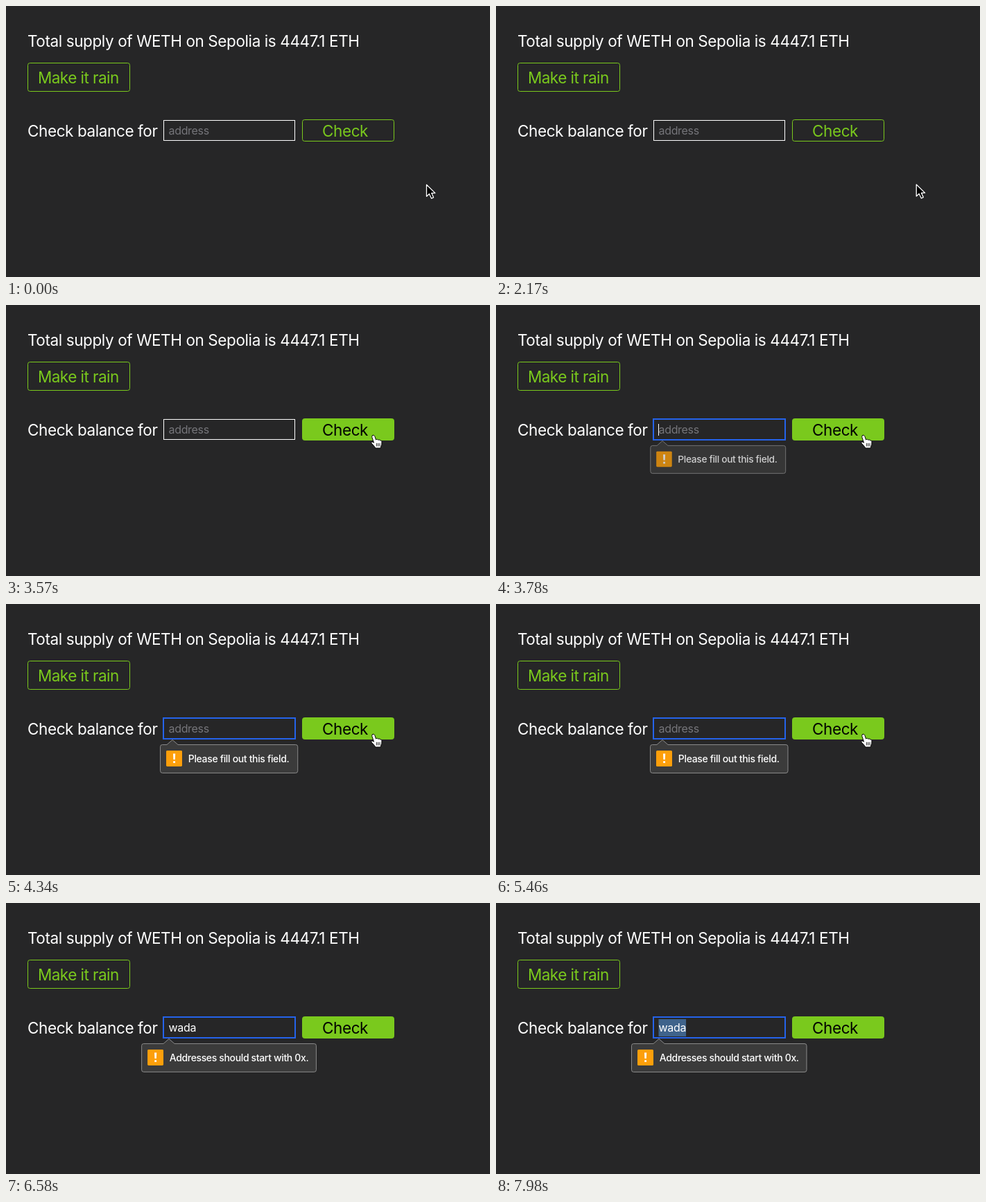
Write an HTML page that moves like this. It is 698 by 392 pixels and loops after 8000 ms.

```html
<!DOCTYPE html>
<html lang="en">
<head>
<meta charset="utf-8">
<title>Check balance</title>
<style>
  html, body { margin: 0; width: 100%; height: 100%; overflow: hidden; background: #262627; }
  svg { display: block; }
  text { font-family: Inter, "Open Sans", sans-serif; fill: #fff; white-space: pre; }
  .big { font-size: 22.5px; letter-spacing: -.4px; }
  .green { fill: #7ac91d; }
  .line { fill: none; stroke: #7ac91d; }
  .field { font-size: 16px; letter-spacing: -.32px; }
  .tip text { font-size: 14px; font-weight: 500; letter-spacing: -.33px; }
  .tip .box { fill: #3b3b3b; stroke: #8b8b8b; }
</style>
</head>
<body>
<svg width="698" height="392" viewBox="0 0 698 392">
  <rect width="698" height="392" fill="#262627"/>
  <text class="big" x="31" y="59">Total supply of WETH on Sepolia is 4447.1 ETH</text>
  <rect class="line" x="31.5" y="82.5" width="147" height="41" rx="3"/>
  <text class="big green" x="46" y="112" style="letter-spacing:-.55px">Make it rain</text>
  <text class="big" x="31" y="189">Check balance for</text>

  <rect id="idle" x="227.5" y="165.5" width="189" height="29" fill="none" stroke="#fff"/>
  <rect id="focus" x="227" y="165" width="190" height="30" fill="none" stroke="#2563eb" stroke-width="2"/>
  <rect id="mark" x="234.5" y="168" height="25" fill="#3f638b"/>
  <text id="hint" class="field" x="234.5" y="186" style="fill:#75757a">address</text>
  <text id="value" class="field" x="234.5" y="186"></text>
  <rect id="caret" y="172" width="1" height="17" fill="#fff"/>

  <rect id="button" x="427.5" y="164.5" width="132" height="31" rx="3" stroke="#7ac91d"/>
  <text id="check" class="big" x="456" y="189">Check</text>

  <g id="tips"></g>

  <path id="arrow" d="M.5 .5V17.4L4.4 13.8L7.5 20.3L10.6 18.9L7.7 12.6H12.9Z"
        fill="#000" stroke="#fff" stroke-width="1.3" stroke-linejoin="round"/>
  <g id="hand" stroke="#000" stroke-linejoin="round" stroke-linecap="round">
    <path fill="#fff" d="M3.4 1.6C5 .9 6 1.9 6.5 3.4L8 8C9 6.9 10.8 7.1 11.2 8.4C12.3 7.5 13.8 7.9 14.1 9.1C15.3 8.6 16.4 9.4 16.5 10.8L16.3 14.5C16 16.5 15 17.5 14.7 20H7.2C6.5 18 4 15.5 1.6 13C.4 11.6 2 10.3 3.5 11.2L5 12.2L2.4 4.4C2 3 2.2 2 3.4 1.6Z"/>
    <path fill="none" stroke-width=".9" d="M8.9 13.2V17M11.2 13.2V17M13.5 13.2V17"/>
  </g>
</svg>
<script>
const LOOP = 8000, FOCUS = 3600, TYPE = 5810, SUBMIT = 5985, SELECT = 7700;
const KEYS = [TYPE, 5870, 5920, 5965];
const BLINK = 500;
const $ = id => document.getElementById(id);
const show = (el, on) => el.setAttribute('visibility', on ? 'visible' : 'hidden');
const clamp = v => Math.min(1, Math.max(0, v));
const ease = v => v * v * (3 - 2 * v);

// Cursor position by time: [ms, x, y]
const PATH = [[0, 606, 258], [2150, 606, 258], [2780, 527, 187.5], [3220, 527, 187.5], [3480, 525.5, 187]];

const tips = [
  { text: 'Please fill out this field.', left: 222.5, right: 421, apex: 240, from: FOCUS, to: TYPE },
  { text: 'Addresses should start with 0x.', left: 195.5, right: 448, apex: 235, from: SUBMIT, to: Infinity }
];

function buildTip(tip) {
  const { left, right, apex, text } = tip, icon = left + 8.5;
  const g = document.createElementNS('http://www.w3.org/2000/svg', 'g');
  g.setAttribute('class', 'tip');
  g.innerHTML = `
    <path class="box" d="M${left + 3} 203.5H${apex - 8}L${apex} 196.5L${apex + 8} 203.5H${right - 3}
      q3 0 3 3V241.5q0 3 -3 3H${left + 3}q-3 0 -3 -3V206.5q0 -3 3 -3Z"/>
    <rect x="${icon}" y="212" width="23" height="23" rx="1.5" fill="#fd9f0b"/>
    <path d="M${icon + 10} 216.5h3.2l-.4 8.5h-2.4ZM${icon + 10.2} 227.3h2.8v2.8h-2.8Z" fill="#fff"/>
    <text x="${icon + 31.8}" y="229">${text}</text>`;
  $('tips').append(g);
  tip.el = g;
}
tips.forEach(buildTip);

function drawTip({ el, apex, from, to }, t) {
  const age = t - from;
  const alpha = clamp(age / 233) * (1 - clamp((t - to) / 133));
  const scale = 1 - .042 * Math.exp(-Math.max(0, age) / 220);
  show(el, alpha > 0);
  el.setAttribute('opacity', alpha);
  el.setAttribute('transform', `translate(${apex} 197) scale(${scale}) translate(${-apex} -197)`);
}

function cursorAt(t) {
  const i = PATH.findIndex(p => p[0] > t);
  if (i < 0) return PATH[PATH.length - 1].slice(1);
  const [t0, x0, y0] = PATH[i - 1], [t1, x1, y1] = PATH[i];
  const k = ease((t - t0) / (t1 - t0));
  return [x0 + (x1 - x0) * k, y0 + (y1 - y0) * k];
}

function render(t) {
  const focused = t >= FOCUS, selected = t >= SELECT;
  const [x, y] = cursorAt(t);
  const hover = x < 558 && y < 195;

  const typed = KEYS.filter(k => k <= t).length;
  $('value').textContent = 'wada'.slice(0, typed);
  const width = typed ? $('value').getComputedTextLength() : 0;
  show($('hint'), !typed);
  show($('idle'), !focused);
  show($('focus'), focused);
  show($('mark'), selected);
  $('mark').setAttribute('width', width);

  const since = t - (typed ? KEYS[typed - 1] : FOCUS);
  show($('caret'), focused && !selected && Math.floor(since / BLINK) % 2 === 0);
  $('caret').setAttribute('x', Math.round(234 + width));

  $('button').setAttribute('fill', hover ? '#7ac91d' : 'none');
  $('check').style.fill = hover ? '#000' : '#7ac91d';

  for (const id of ['arrow', 'hand']) {
    show($(id), t < TYPE && (id === 'hand') === hover);
    $(id).setAttribute('transform', `translate(${x} ${y})`);
  }
  tips.forEach(tip => drawTip(tip, t));
}

const start = performance.now();
function tick() {
  render((performance.now() - start) % LOOP);
  requestAnimationFrame(tick);
}
render(0);
requestAnimationFrame(tick);
</script>
</body>
</html>
```
